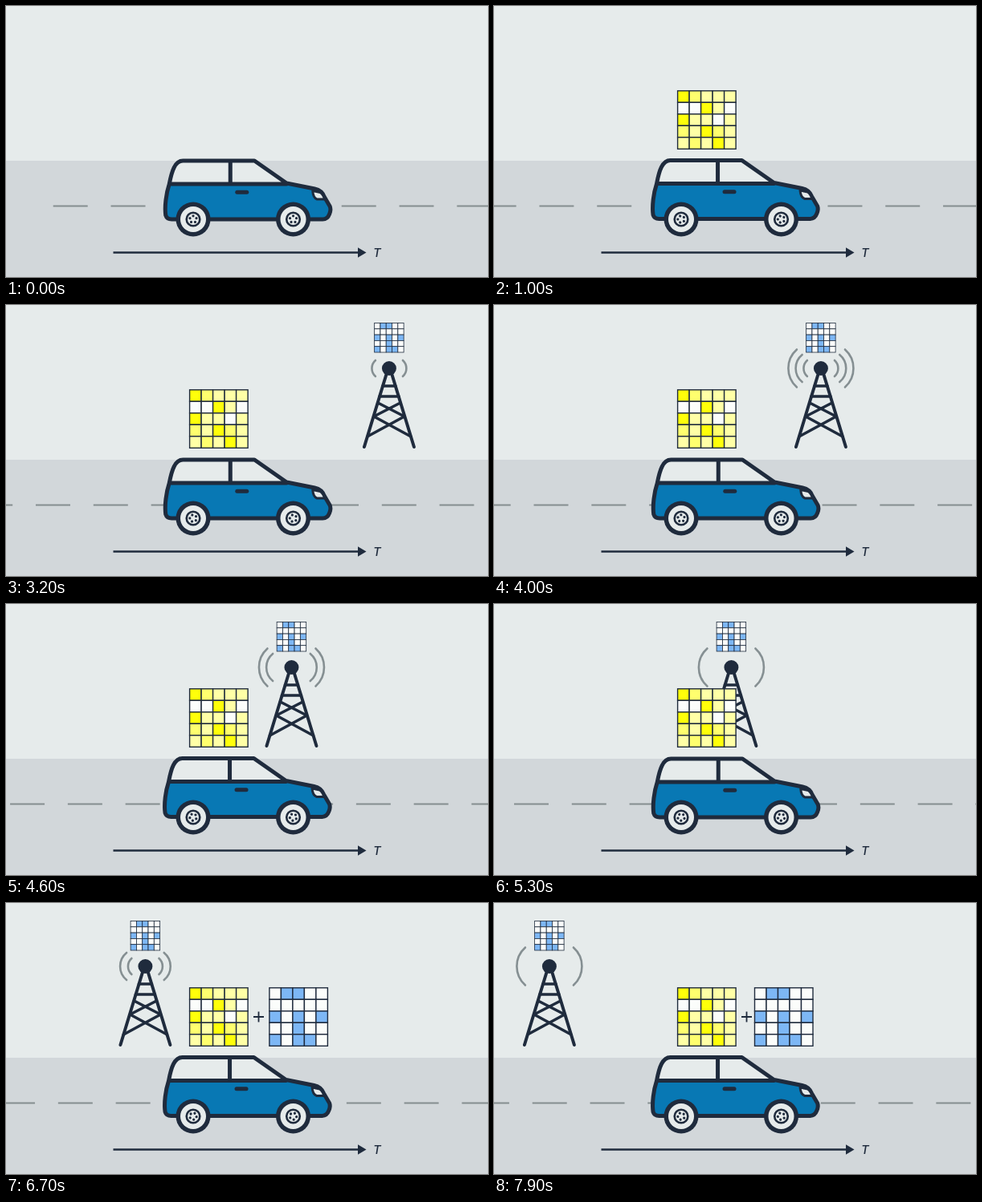
Animation of 600x338 px, one loop 8 s. Source, as an HTML page:

```html
<!DOCTYPE html>
<html lang="en">
<head>
<meta charset="utf-8">
<title>Car and radio mast</title>
<style>
  html, body { margin: 0; width: 100%; height: 100%; overflow: hidden; }
  svg { display: block; width: 100vw; height: 100vh; }
  .line { fill: none; stroke: #1f2b3d; stroke-linecap: round; stroke-linejoin: round; }
  .ink { fill: #1f2b3d; }
  .pale { fill: #e6ebeb; }
  text { font: italic 500 15px Inter, Roboto, sans-serif; }
</style>
</head>
<body>
<svg viewBox="0 0 600 338">
  <defs>
    <g id="wheel">
      <circle class="ink" r="21.5"/>
      <circle class="pale" r="16"/>
      <circle class="line" r="8.3" stroke-width="2.6"/>
      <g class="hub"></g>
    </g>
  </defs>

  <rect class="pale" width="600" height="338"/>
  <rect y="193" width="600" height="145" fill="#d2d7da"/>
  <path id="dashes" d="M-72 249.5H720" stroke="#858e90" stroke-width="2.2" stroke-dasharray="43 28.8"/>

  <g id="mast">
    <g id="waves" fill="none" stroke="#858f92" stroke-width="2.6" stroke-linecap="round"></g>
    <path class="line" stroke-width="4" d="M-3 85L-31 177M3 85L31 177"/>
    <path class="line" stroke-width="3.6" d="M-8 101H8M-12 114H12M-14 122L19 139M14 122L-19 139M-19 139L27 164M19 139L-27 164"/>
    <circle class="ink" cy="79" r="9"/>
    <g id="smallGrid" transform="translate(-18.3 22.5)"></g>
  </g>

  <g id="yellowGrid" transform="translate(228.6 105.8)"></g>
  <g id="received">
    <path class="line" stroke-width="1.8" style="stroke-linecap:butt" d="M308 142H321M314.5 135.5V148.5"/>
    <g id="blueGrid"></g>
  </g>

  <g id="car">
    <path class="pale" d="M203 222C206 206 210 193 220 193H309L349 222Z"/>
    <path fill="#0878b4" d="M203 222H349L384 228Q393 230 396 238L404 251Q405 255 403 260Q401 266 396 266H206Q200 266 198.500 261C197 250 199 234 203 222Z"/>
    <path class="line" stroke-width="5" d="M203 222C206 206 210 193 220 193H309L349 221L384 228Q393 230 396 238L403 250Q404.500 254 402.500 259Q400 266 394 266H206Q200 266 198.500 261C197 250 199 234 203 222H349M279 193V222"/>
    <path class="line" stroke-width="5" d="M287.500 232.300H299.500"/>
    <path class="line pale" style="fill:#e6ebeb" stroke-width="3" d="M381.500 230.500L391 232.500Q394.500 235 396.500 241H387Q382 239 381.500 230.500Z"/>
  </g>
  <use href="#wheel" x="233" y="266"/>
  <use href="#wheel" x="357.500" y="266"/>

  <path class="line" style="stroke-linecap:butt" stroke-width="2.5" d="M133.500 307.500H440"/>
  <path class="ink" d="M438 301.300L448.500 307.500L438 313.700Z"/>
  <text class="ink" x="457" y="313">T</text>
</svg>
<script>
const LOOP = 8000;
const DASH_PERIOD = 71.8, ROAD_SPEED = 0.0741;
const WAVE_PERIOD = 2900;
const COLORS = { Y: '#ffff0a', M: '#ffff6e', L: '#ffffa6', W: '#fbfdfb', B: '#7db7f5' };
const YELLOW = ['YMLLL', 'WWYLW', 'YLLWL', 'MLYML', 'LMLYL'];
const BLUE = ['WBBWW', 'WWWWW', 'BWBWB', 'WWBWW', 'BWBBW'];
const MAST_KEYS = [[1900, 592], [3200, 477], [4000, 407], [5300, 295.5], [6700, 173.5], [7900, 69]];

const el = id => document.getElementById(id);
const clamp = v => Math.max(0, Math.min(1, v));
const ramp = (t, from, to) => clamp((t - from) / (to - from));
const move = (id, x, y) => el(id).setAttribute('transform', `translate(${x} ${y})`);

function drawGrid(id, rows, cell, line) {
  el(id).innerHTML = rows.map((row, r) => [...row].map((c, i) =>
    `<rect x="${i * cell}" y="${r * cell}" width="${cell}" height="${cell}" fill="${COLORS[c]}" stroke="#1f2b3d" stroke-width="${line}"/>`
  ).join('')).join('');
}

function arcPair([reach, half, sag, radius]) {
  const x = reach - sag;
  return `<path d="M${-x} ${79 - half}A${radius} ${radius} 0 0 0 ${-x} ${79 + half}M${x} ${79 - half}A${radius} ${radius} 0 0 1 ${x} ${79 + half}"/>`;
}

drawGrid('yellowGrid', YELLOW, 14.5, 1.4);
drawGrid('blueGrid', BLUE, 14.5, 1.4);
drawGrid('smallGrid', BLUE, 7.3, 0.8);
el('waves').innerHTML = [[21.5, 10, 4.5, 13.4], [31.3, 17, 8, 22], [40.5, 23.5, 10.5, 31.5]].map(arcPair).join('');

const hub = document.querySelector('.hub');
for (let i = 0; i < 5; i++) {
  const a = i * Math.PI * 2 / 5;
  hub.innerHTML += `<circle class="ink" cx="${4.2 * Math.sin(a)}" cy="${-4.2 * Math.cos(a)}" r="1.6"/>`;
}

// Linear between keys, extended beyond both ends.
function mastX(t) {
  let i = 0;
  while (i < MAST_KEYS.length - 2 && t > MAST_KEYS[i + 1][0]) i++;
  const [t0, x0] = MAST_KEYS[i], [t1, x1] = MAST_KEYS[i + 1];
  return x0 + (x1 - x0) * (t - t0) / (t1 - t0);
}

function render(t) {
  move('dashes', (59 - ROAD_SPEED * t) % DASH_PERIOD + DASH_PERIOD, 0);
  move('mast', mastX(t), 0);

  const phase = t % WAVE_PERIOD;
  [...el('waves').children].forEach((arc, i) => {
    const on = 50 + 450 * i, off = on + 1550;
    arc.setAttribute('opacity', Math.min(ramp(phase, on, on + 100), 1 - ramp(phase, off - 100, off)));
  });

  const bob = (1 - Math.cos((t - 50) * Math.PI / 200)) / 2;
  move('car', 0.4 - bob, 0.2 - 0.9 * bob);
  hub.setAttribute('transform', `rotate(${t * ROAD_SPEED / 21.5 * 180 / Math.PI})`);

  el('yellowGrid').setAttribute('opacity', ramp(t, 300, 700));
  el('received').setAttribute('opacity', ramp(t, 5700, 6200));
  move('blueGrid', 324.5 + 3.4 * (7900 - t) / 1200, 105.8);
}

const start = performance.now();
function tick(now) {
  render(Math.max(0, now - start) % LOOP);
  requestAnimationFrame(tick);
}
render(0);
requestAnimationFrame(tick);
</script>
</body>
</html>
```
